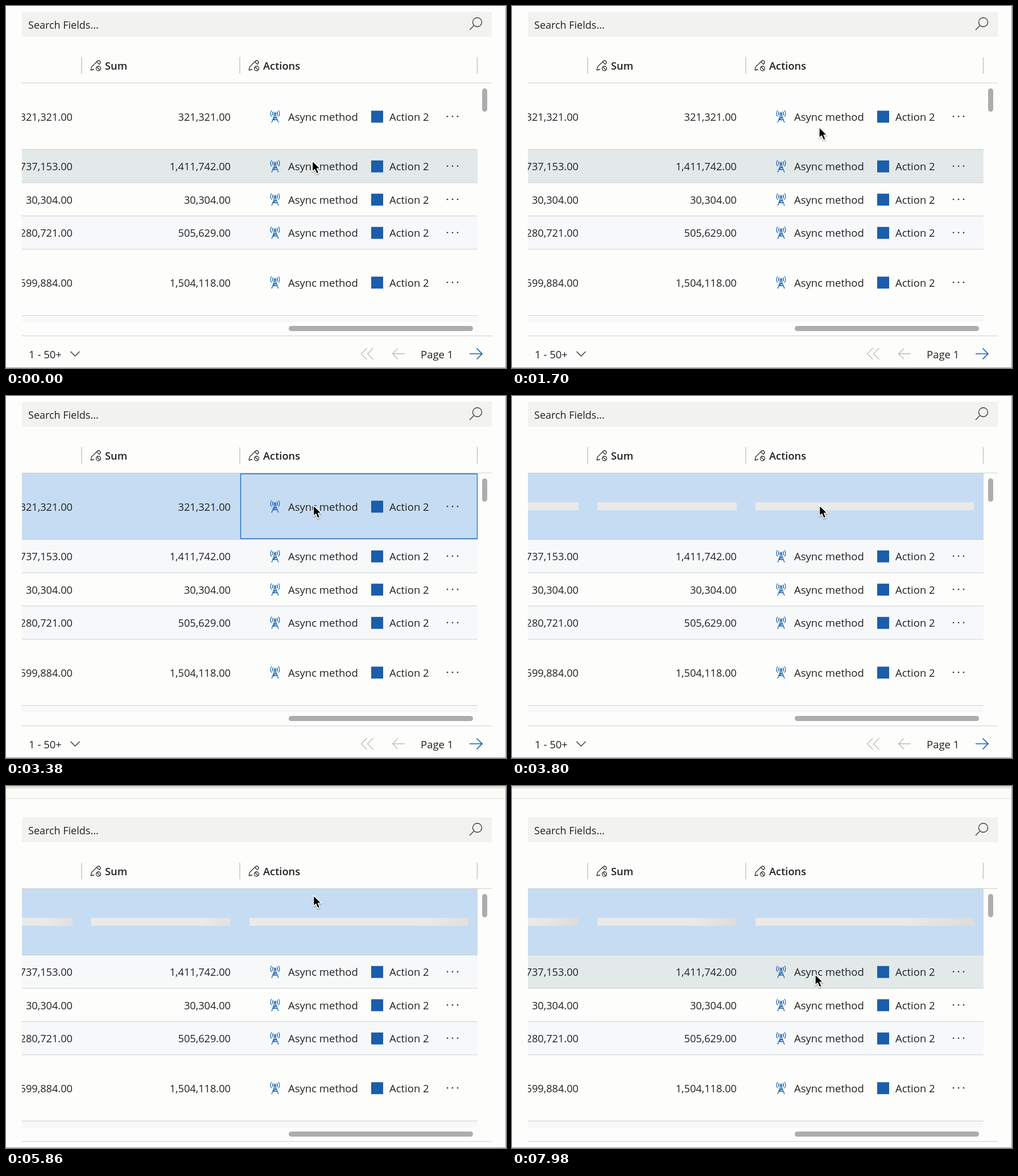
Animation, 879 px wide and 637 px high, one loop 8000 ms. Source, as an HTML page:

```html
<!DOCTYPE html>
<html lang="en">
<head>
<meta charset="utf-8">
<title>Grid with async row action</title>
<style>
  html, body { margin: 0; width: 100%; height: 100%; overflow: hidden; background: #fdfdfb; }
  svg { display: block; width: 100vw; height: 100vh; }
  text { font: 18.5px "Open Sans", "Noto Sans", sans-serif; fill: #222; }
  .bold { font-weight: 600; font-size: 18.3px; }
  .end { text-anchor: end; font-size: 18.2px; }
  .search { font-size: 18px; }
  .rule { stroke: #cbd1d0; }
  .line { fill: none; stroke: #333; stroke-width: 1.3; }
  .blue { stroke: #1763b2; }
  .pale { stroke: #bcbcbc; }
</style>
</head>
<body>
<svg id="stage" viewBox="0 0 879 637">
  <defs>
    <clipPath id="gridClip"><path d="M28 136H829V556H28Z"/></clipPath>
    <linearGradient id="shimmer">
      <stop offset="0" stop-color="#eaeaea"/>
      <stop offset=".5" stop-color="#d6d6d6"/>
      <stop offset="1" stop-color="#eaeaea"/>
    </linearGradient>
    <linearGradient id="shade" x2="0" y2="1">
      <stop offset="0" stop-color="#d3d3c6"/>
      <stop offset="1" stop-color="#fbfbf8"/>
    </linearGradient>
    <filter id="soft" x="-50%" y="-50%" width="200%" height="200%">
      <feDropShadow dx="0" dy="1.5" stdDeviation="1.3" flood-opacity=".4"/>
    </filter>
    <g id="pencil" class="line">
      <path d="M1 18 2.500 12 13 1.600Q15 .2 17 2 19 4 17.400 6L15.500 8M1 18 7 16.500M11.500 3.200 15.500 7.200"/>
      <circle cx="14.5" cy="15" r="4"/>
      <path d="M11.700 12.200 17.300 17.800"/>
    </g>
    <g id="antenna" class="line blue">
      <path d="M-6 11 0-4 6 11M-4 6H4M-2.200 2H2.200M-4 6 2.200 2"/>
      <circle cy="-5" r="1.5"/>
      <path d="M-3.400-8.400Q-5.300-5-3.400-1.600M3.400-8.400Q5.300-5 3.400-1.600M-6-10.500Q-9.800-5-6 .5M6-10.500Q9.800-5 6 .5"/>
    </g>
  </defs>

  <g id="page">
    <path fill="#f2f2f1" d="M28 10H854V54H28Z"/>
    <text class="search" x="39" y="40">Search Fields...</text>
    <g class="line"><circle cx="828.5" cy="28.5" r="8"/><path d="M822.500 34.500 815 42"/></g>

    <path class="rule" d="M133 90V119M411 90V119M828.500 90V119" style="stroke:#c6c6c6;stroke-width:1.5"/>
    <use href="#pencil" x="148" y="95"/><text class="bold" x="174" y="112">Sum</text>
    <use href="#pencil" x="426" y="95"/><text class="bold" x="452" y="112">Actions</text>

    <g id="grid" clip-path="url(#gridClip)"></g>
    <path class="rule" d="M28 135.500H854M28 580.500H854"/>
    <g fill="#adadad">
      <rect x="837" y="145" width="9" height="41" rx="4.5"/>
      <rect x="497" y="563" width="324" height="9" rx="4.5"/>
    </g>

    <text x="40" y="620">1 - 50+</text>
    <text x="729" y="620">Page 1</text>
    <path class="line" d="M113.500 608 121.500 616 129.500 608"/>
    <path class="line pale" d="M634.500 602 624.500 612 634.500 622M645.500 602 635.500 612 645.500 622M701 612H680M689 602.500 679.500 612 689 621.500"/>
    <path class="line blue" d="M815 612H836.500M827.500 602.500 837 612 827.500 621.500" style="stroke-width:1.7"/>
  </g>

  <g id="banner">
    <path fill="#fbfbf8" d="M0 0H879V22H0Z"/>
    <path fill="url(#shade)" d="M0 0H879V6H0Z"/>
    <path stroke="#dcdce0" d="M0 22H879"/>
  </g>
  <path fill="none" stroke="#9a9a9a" d="M878.500 0V636.500H0"/>
  <path id="cursor" filter="url(#soft)" stroke="#fff" stroke-width="1.4" stroke-linejoin="round"
        d="M0 0V18.800L4.300 15 7.500 22.500 11.300 20.800 8.100 13.600H13.800Z"/>
</svg>

<script>
const LOOP = 8000;
const HOVER_TOP = 1800, SELECT = 2150, LOADING = 3600, SHIFT = 3980, HOVER_SECOND = 7050;
const SHIMMER_PERIOD = 1090, SHIMMER_START = 629;
const PLAIN = '#fdfdfb', STRIPE = '#f7f8fa', HOVER = '#e3e9e9', SELECTED = '#c6dcf2';

const $ = id => document.getElementById(id);
const rows = [
  { top: 136, bottom: 252.5, cells: ['321,321.00', '321,321.00'] },
  { top: 252.5, bottom: 311, cells: ['737,153.00', '1,411,742.00'] },
  { top: 311, bottom: 369.5, cells: ['30,304.00', '30,304.00'] },
  { top: 369.5, bottom: 428, cells: ['280,721.00', '505,629.00'] },
  { top: 428, bottom: 544.5, cells: ['599,884.00', '1,504,118.00'] },
  { top: 544.5, bottom: 603 }
];

function contentMarkup({ top, bottom, cells }) {
  if (!cells) return '';
  const y = (top + bottom) / 2, baseline = y + 7.5;
  return `<g class="content">
    <text class="end" x="117" y="${baseline}">${cells[0]}</text>
    <text class="end" x="395" y="${baseline}">${cells[1]}</text>
    <use href="#antenna" x="473" y="${y}"/>
    <text x="496" y="${baseline}">Async method</text>
    <rect x="642" y="${y - 10}" width="21" height="21" fill="#1a5dab"/>
    <text x="674" y="${baseline}">Action 2</text>
    ${[776, 785, 794].map(x => `<circle cx="${x}" cy="${y}" r="1.3" fill="#333"/>`).join('')}
  </g>`;
}

const backMarkup = ({ top, bottom }) =>
  `<rect class="row" x="28" y="${top}" width="801" height="${bottom - top}"/>`;
const ruleMarkup = ({ bottom }) => `<path class="rule" d="M28 ${bottom}H829"/>`;
const barMarkup = (x, width) =>
  `<rect x="${x}" y="187" width="${width}" height="14" fill="url(#shimmer)"/>`;

$('grid').innerHTML =
  [backMarkup, ruleMarkup, contentMarkup].map(part => rows.map(part).join('')).join('') + `
  <g id="skeleton">${barMarkup(-128, 245)}${barMarkup(150, 245)}${barMarkup(428, 384)}</g>
  <rect id="focus" x="412.5" y="137" width="416" height="114" class="line blue" stroke-width="1.5"/>`;

const rowRects = document.querySelectorAll('.row');
const firstContent = document.querySelector('.content');

const smooth = p => p * p * (3 - 2 * p);
const progress = (t, from, to) => smooth(Math.min(1, Math.max(0, (t - from) / (to - from))));
const show = (element, visible) => element.style.display = visible ? '' : 'none';

function rowFill(index, t) {
  if (index === 0 && t >= SELECT) return SELECTED;
  const hovered = t < HOVER_TOP || t >= HOVER_SECOND ? 1 : t < SELECT ? 0 : -1;
  return index === hovered ? HOVER : index % 2 ? STRIPE : PLAIN;
}

function render(t) {
  const loading = t >= LOADING, shifted = t >= SHIFT;
  rowRects.forEach((rect, i) => rect.setAttribute('fill', rowFill(i, t)));
  show(firstContent, !loading);
  show($('skeleton'), loading);
  show($('focus'), t >= SELECT && !loading);
  show($('banner'), shifted);
  $('page').setAttribute('transform', `translate(0 ${shifted ? 45 : 0})`);

  const cycle = (t - SHIMMER_START + LOOP * SHIMMER_PERIOD) / SHIMMER_PERIOD % 1;
  const sweep = 2 * smooth(cycle) - 1;
  $('shimmer').setAttribute('x1', sweep);
  $('shimmer').setAttribute('x2', sweep + 0.9);

  const up = progress(t, 1480, 1812), down = progress(t, 6550, 7116);
  const x = 538.5 + 2 * up - 7.5 * down, y = 272.5 - 80 * up + 139 * down;
  $('cursor').setAttribute('transform', `translate(${x} ${y})`);
}

function tick() {
  render(performance.now() % LOOP);
  requestAnimationFrame(tick);
}
tick();
</script>
</body>
</html>
```
